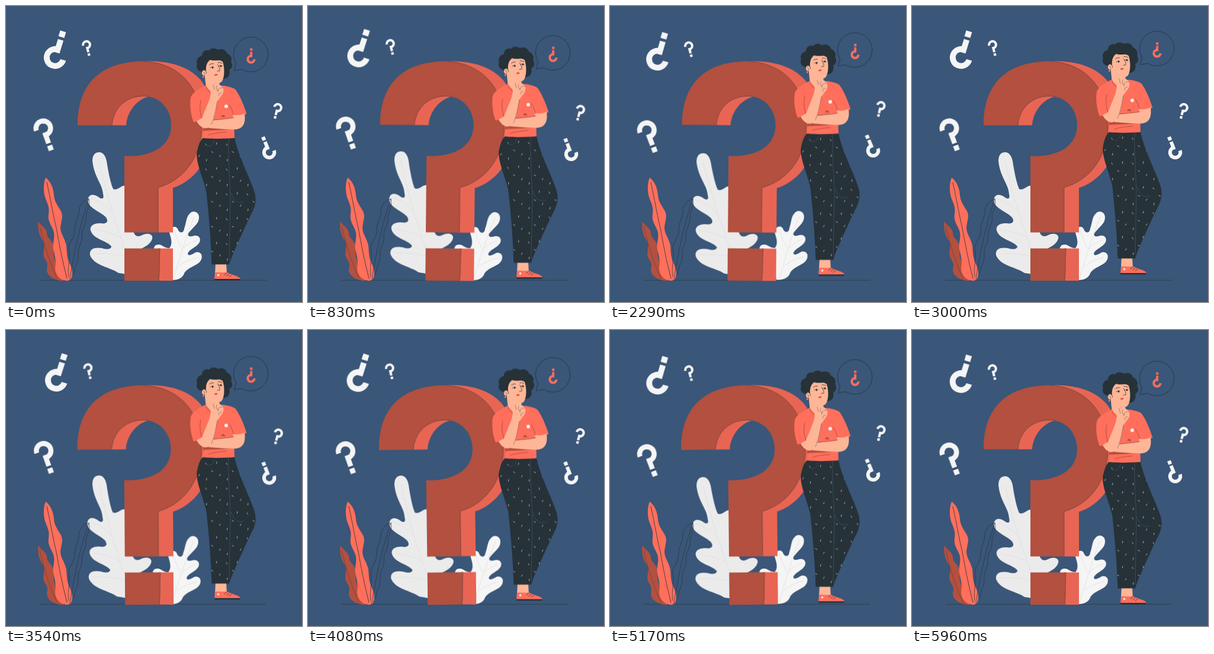
Recreate the animation shown at these times as an HTML page without scripts. Size 500x500 px, loop 6000 ms.

```html
<!DOCTYPE html>
<html lang="en">
<head>
<meta charset="utf-8">
<title>Wondering</title>
<style>
  html, body { margin: 0; width: 100%; height: 100%; overflow: hidden; background: #3a5679; }
  svg { display: block; width: 100vw; height: 100vh; }
  .sway { animation: sway 3s linear infinite; transform-origin: 256px 252px; }
  .tilt { animation: sway 6s linear infinite; transform-origin: 229px 278px; }
  .float { animation: float 6s linear infinite; }
  @keyframes sway {
    0%, 100% { transform: rotate(0deg); }
    25% { transform: rotate(1deg); }
    75% { transform: rotate(-1deg); }
  }
  @keyframes float {
    0%, 100% { transform: translateY(0); }
    50% { transform: translateY(-10px); }
  }
  .dark { fill: #263238; }
  .coral { fill: #ff6f5c; }
  .brick { fill: #b3503f; }
  .side { fill: #e86553; }
  .white { fill: #f5f5f5; }
  .pale { fill: #ebebeb; }
  .skin { fill: #ffb697; }
  .line { fill: none; stroke: #263238; stroke-width: .8; stroke-linecap: round; stroke-linejoin: round; }
  .vein { fill: none; stroke: #dedede; stroke-width: .8; }
  .fold { fill: none; stroke: #b3503f; stroke-width: 1; stroke-linecap: round; }
</style>
</head>
<body>
<svg viewBox="0 0 500 500" preserveAspectRatio="none">
  <defs>
    <g id="ask">
      <path d="M-12.300 0A12.300 12.300 0 1 1 -3 11.900" fill="none" stroke="currentColor" stroke-width="8.400"/>
      <path d="M-4.400 7.400H4V27H-4.400ZM-4.400 31H4.400V39.800H-4.400Z" fill="currentColor"/>
    </g>
    <pattern id="specks" width="35" height="42" patternUnits="userSpaceOnUse" patternTransform="translate(332 226)">
      <path d="M5 7l1.600 2.400M24 5l-.6 2.800M15 20l2.500 1.400M30 26l-1.500 2.500M7 33l-.5 2.800"
        stroke="#d5d8da" stroke-width=".8" stroke-linecap="round"/>
    </pattern>
    <path id="trousers" d="M333 223L386 222.500C391 250 412 290 420 315C424 330 420 341 414 352C400 381 387 410 379 430L377 436.500H347.500C346 390 342 345 338 312C332 287 318 259 323.500 243C326 232 329 226 333 223Z"/>
  </defs>

  <path class="line" d="M57 463.300H439" opacity=".75"/>

  <g id="plants">
    <path class="brick" d="M54.500 364C53 376 56 388 62 396C68 404 61 414 64 424C68 432 72 434 69 444C68 456 82 464 97 464C98 455 85 445 83 430C78 420 82 412 80 404C77 394 69 393 69 383C68 375 60 372 54.500 364Z"/>
    <path class="line" d="M57 372C62 395 72 430 86 460" opacity=".45"/>
    <path class="coral" d="M67 290C63 299 63 313 66 323C70 334 74 340 72 351C70 363 76 369 80 379C84 391 78 399 80 411C83 424 85 430 83 442C83 455 92 464 104 464C113 463 114 450 109 438C102 425 103 415 102 405C100 393 92 385 92 375C93 362 98 355 92 345C86 335 82 330 81 320C80 305 74 295 67 290Z"/>
    <path class="line" d="M69 298C76 330 79 350 85 375C89 397 95 430 103 460"/>
  </g>

  <g class="sway">
    <path class="pale" d="M146 262C146 250 152 247 157 247C164 247 168 253 170 262C173 282 177 300 181 309C190 313 194 301 203 304L216 383C219 390 224 390 230 387C240 382 249 386 247 393C244 403 235 406 227 411L224 456C210 455 199 452 190 451C176 441 149 439 142 421C140 410 150 407 162 409C170 412 178 411 178 406C170 396 147 394 143 379C141 372 148 366 160 367C171 369 174 363 168 356C158 346 134 340 139 324C142 317 150 318 158 324C163 327 166 325 164 318C163 300 149 290 146 262Z"/>
    <path class="white" d="M311 350C316 344 327 348 326 358C326 368 315 374 308 384C306 390 312 390 318 388C325 387 330 392 327 399C322 408 310 410 307 418C308 424 315 419 321 416C328 415 333 420 330 428C325 440 305 440 300 454C295 462 288 463 278 463L250 413C249 408 251 403 258 403C265 403 266 409 276 409C282 402 279 393 276 383C275 374 288 368 291 379C294 384 300 384 301 376C305 365 304 356 311 350Z"/>
    <g class="vein">
      <path d="M157 262C168 310 190 390 218 450M143 325C160 331 172 338 180 350M149 378C168 380 182 385 194 391M148 419C172 417 190 420 205 424"/>
      <path d="M318 356C304 390 292 430 283 460M284 378C288 393 292 400 296 408M322 395C310 400 302 405 297 412M324 425C310 428 300 433 291 440"/>
    </g>
    <g color="#f5f5f5">
      <use href="#ask" transform="translate(83 87) rotate(197) scale(1.160)"/>
      <use href="#ask" transform="translate(136 65.500) rotate(-14) scale(.480)"/>
      <use href="#ask" transform="translate(63 206.500) rotate(-20)"/>
      <use href="#ask" transform="translate(459 171.700) rotate(15) scale(.480)"/>
      <use href="#ask" transform="translate(444.600 247.300) rotate(158) scale(.710)"/>
    </g>
  </g>

  <path class="line" d="M140 326C130 328 122 338 123 350C121 362 115 368 116 382C114 395 105 400 106 412C110 422 103 440 106 457M140 326C143 336 137 345 135 355C137 368 128 375 128 388C130 400 120 408 122 420C123 432 115 440 114 454M140 326C128 360 118 400 108 461" opacity=".8"/>

  <g class="tilt">
    <path class="side" d="M230 93.500C275 91 308 102 328 124C350 150 352 200 345 230C338 275 305 301 282 307V382.500H255V300C300 285 325 240 320 190C315 130 270 100 230 93.500Z"/>
    <path class="side" d="M178 201.500H203C204 180 220 158 241 153L215 148L178 180Z"/>
    <path class="brick" d="M121 201.500C121 131 160 93.500 233 93.500C295 96 330 140 331 200C331 255 300 295 257 306.500V382.500H200V253.500C251 255.500 279 234 279 201C279 178 265 157 240 152.700C212 149 182 165 179 201.500Z"/>
    <path class="line" d="M233 93.500C295 96 330 140 331 200C331 255 300 295 257 306.500V382.500M179 201.500C182 165 212 149 240 152.700" opacity=".6"/>
    <path class="side" d="M257 409.500H282V464H257Z"/>
    <path class="brick" d="M200 409.500H260C258.500 428 260 445 258 464H200Z"/>
    <path class="line" d="M260 409.500C258.500 428 260 445 258 464" opacity=".6"/>
  </g>

  <g class="float">
    <g id="legs">
      <path class="skin" d="M354 435H372L373 452H353Z"/>
      <path class="coral" d="M353 450C360 449 367 451 373 449.500C380 454 393 456 395.500 460V463H352Z"/>
      <path class="dark" d="M352 461H395.500V463.500H352Z"/>
      <circle class="white" cx="358.500" cy="454.500" r="1.700"/>
      <path class="line" d="M369 454l4-3M373 456l4-3.500M377 457.500l4-3"/>
      <use href="#trousers" class="dark"/>
      <use href="#trousers" fill="url(#specks)"/>
      <path d="M376 224C375 250 378 290 379 325L377 430M336 233C342 240 350 237 352 227M380 315C384 328 390 334 402 331" fill="none" stroke="#435361" stroke-width=".8"/>
    </g>

    <g id="head">
      <path class="dark" d="M338 125C334 121 332 116 331 111C324 110 320 104 323 98C320 92 325 85 331 84C331 77 337 73 343 75C347 70 354 71 358 74C364 71 372 74 373 80C379 82 383 89 380 94C384 100 382 106 377 108C379 115 376 122 368 123Z"/>
      <path class="skin" d="M335 112L338 139C343 148 355 148 361 138L360 124Z"/>
      <path class="skin" d="M338 110C337 101 340 94 345 91C353 94 360 89 366 94C369 102 370 119 365 127C359 134 347 130 342 123Z"/>
      <ellipse class="skin" cx="334.500" cy="113" rx="3.600" ry="4.600"/>
      <path class="line" d="M333 111q3 1 3 5" opacity=".6"/>
      <circle class="coral" cx="333.500" cy="119.500" r="1.700"/>
      <path class="line" d="M343.500 99.500q3-3 7-2M358 95.500q4-1 7 1.500" stroke-width="1.500"/>
      <path class="line" d="M345 104.500q3-3 6-1M359 101.500q3-2 6 0M357.500 99C360 103 362 107 361 109.500L357 110"/>
      <ellipse class="dark" cx="349" cy="104" rx="1.300" ry="1.700"/>
      <ellipse class="dark" cx="363" cy="101.500" rx="1.300" ry="1.700"/>
      <path d="M351.500 117Q354 113 358 116Q355 119 351.500 117Z" fill="#d94b3e"/>
    </g>

    <g id="body">
      <path class="coral" d="M338 134C343 146 355 146 360 136L367 134.500C376 136 385 138 388 141.500C395 151 402 168 406.500 182C400 185 393 187 385 187L386 223C370 224 350 225 332 223L334 208L331 190C327 193 322 195 317 196.500C312 184 310 168 312 155C314 147 325 140 338 134Z"/>
      <path class="fold" d="M331 190C327 178 327 168 329 160M385 187C383 177 380 172 377 167M338 137C340 147 355 152 363 141M342 218C350 215 360 214 372 213"/>
      <path class="brick" d="M334 205L356 206L380 208C366 210 347 209.500 332.500 211ZM363 187C366 182 370 184 370 188Z"/>
      <circle class="white" cx="372" cy="169.500" r="3"/>
      <path class="skin" d="M344 194C357 192 374 191 384 189L383 184C391 185 398 184 403 181.500C405 196 402 207 388 208.500C372 209 356 207 342 206Z"/>
      <path class="line" d="M351 192.500C363 191 375 191 385 188.500" opacity=".55"/>
      <path class="skin" d="M322 194.500L331 189.500L344 157L346 147L339.500 127C339 122 343 121 345 125L350 133C356 131 362 132 366 137C369 143 367 149 362 154L357 161C354 180 351 196 345 203C338 210 328 206 322 194.500Z"/>
      <path class="line" d="M350 133L352 141M356 135C354 140 356 143 359 143M366 138C361 138 357 140 358 145M364 147C361 146 358 149 360 152M357 161C354 178 351 191 347 200" opacity=".5"/>
    </g>

    <path class="line" d="M388.500 97L385.500 109L398.500 107A29.200 29.200 0 1 0 388.500 97Z"/>
    <use href="#ask" color="#ff6f5c" transform="translate(414 89.800) rotate(181) scale(.460)"/>
  </g>
</svg>
</body>
</html>
```
